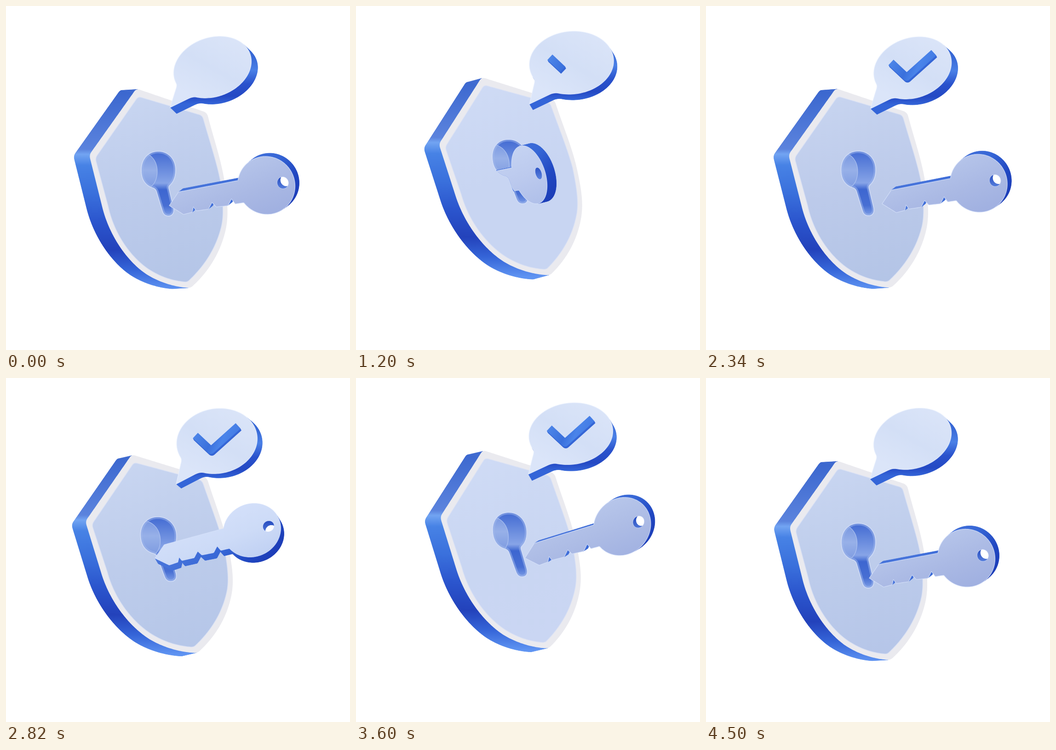
These frames come from a looping animation (748 by 748 pixels, 4530 ms). An HTML page with a canvas:

```html
<!DOCTYPE html>
<html lang="en">
<head>
<meta charset="utf-8">
<title>Shield and key</title>
<style>
html, body { margin: 0; width: 100%; height: 100%; overflow: hidden; background: #fff; }
canvas { display: block; width: 748px; height: 748px; }
</style>
</head>
<body>
<canvas id="stage" width="748" height="748"></canvas>
<script>
const g = document.getElementById('stage').getContext('2d');
const LOOP = 4530, SWAY = LOOP / 2;

// Sample an SVG path into points
function trace(d, step = 3) {
  const p = document.createElementNS('http://www.w3.org/2000/svg', 'path');
  p.setAttribute('d', d);
  const len = p.getTotalLength(), n = Math.round(len / step), out = [];
  for (let i = 0; i < n; i++) {
    const q = p.getPointAtLength(len * i / n);
    out.push([q.x, q.y]);
  }
  return out;
}

const RIM = trace('M279,186 Q283,180 290,182 L430,230 Q437,233 439,240 C452,290 466,330 474,375 ' +
  'C483,430 484,460 477,490 C465,540 438,580 406,609 Q402,613 396,613 C365,611 330,600 302,581 ' +
  'C261,552 225,498 210,440 L183,332 Q181,324 185,318 Z');
const PANEL = trace('M284,202 Q288,197 294,199 L421,237 Q427,239 429,246 C443,295 458,340 466,380 ' +
  'C473,430 474,460 467,485 C455,530 430,567 398,597 Q394,601 387,600 C360,597 335,589 308,571 ' +
  'C268,543 234,492 222,435 L196,338 Q194,331 198,325 Z');
const HOLE = trace('M317,395 C301,389 294,375 294,357 C294,333 309,316 331,316 C354,316 369,334 369,357 ' +
  'C369,372 364,384 355,391 Q353,394 355,400 L364,438 C367,450 362,457 353,457 C346,457 342,453 340,446 ' +
  'L327,403 Q325,397 317,395 Z');
const KEY = trace('M352,438 L373,408 L504,382 A63,63 0 1 1 516,430 L497,433 L489,422 L481,437 L455,440 ' +
  'L446,430 L438,445 L411,449 L405,440 L402,452 L383,457 Z', 2);
const EYE = trace('M590,387 A12.5,13 0 1 1 615,385 A12.5,13 0 1 1 590,387 Z', 2);
const FRONT = [[312, 150], [950, 150], [950, 800], [352, 800], [340, 455]];

// Frames the shapes above are drawn in: origin and two axes
const SHIELD_BASE = [285, 181, -104, 141, 113, 432];
const KEY_BASE = [562, 394, -210, 44, -13, -62];

const wave = (t, mid, c, s) => {
  const a = 2 * Math.PI * t / SWAY;
  return mid + c * Math.cos(a) + s * Math.sin(a);
};
const ramp = (t, a, b) => {
  const s = Math.min(1, Math.max(0, (t - a) / (b - a)));
  return s * s * (3 - 2 * s);
};

function mapper(a, b) {
  const det = a[2] * a[5] - a[3] * a[4];
  return pts => pts.map(([x, y]) => {
    x -= a[0]; y -= a[1];
    const u = (x * a[5] - y * a[4]) / det, v = (a[2] * y - a[3] * x) / det;
    return [b[0] + u * b[2] + v * b[4], b[1] + u * b[3] + v * b[5]];
  });
}

const shift = (pts, dx, dy) => pts.map(([x, y]) => [x + dx, y + dy]);

function outline(...shapes) {
  const p = new Path2D();
  for (const pts of shapes) {
    pts.forEach(([x, y], i) => i ? p.lineTo(x, y) : p.moveTo(x, y));
    p.closePath();
  }
  return p;
}

// Linear gradient with stops given as position, colour pairs
function shade(x0, y0, x1, y1, ...stops) {
  const f = g.createLinearGradient(x0, y0, x1, y1);
  for (let i = 0; i < stops.length; i += 2) f.addColorStop(stops[i], stops[i + 1]);
  return f;
}

const mix = (a, b, k) => 'rgb(' + a.map((v, i) => Math.round(v + (b[i] - v) * k)).join() + ')';

function fill(path, style) {
  g.fillStyle = style;
  g.fill(path);
}

function line(path, style, width) {
  g.strokeStyle = style;
  g.lineWidth = width;
  g.stroke(path);
}

// Side walls of a clockwise outline that face the viewer
function extrude(pts, dx, dy, style) {
  g.lineJoin = 'round';
  fill(outline(shift(pts, dx, dy)), style);
  pts.forEach(([x, y], i) => {
    const [u, v] = pts[(i + 1) % pts.length];
    if ((v - y) * dx <= (u - x) * dy) return;
    const quad = outline([[x, y], [u, v], [u + dx, v + dy], [x + dx, y + dy]]);
    fill(quad, style);
    line(quad, style, 0.7);
  });
}

function shieldPose(t) {
  return {
    frame: [
      wave(t, 279.6, 5.4, -4.6), wave(t, 168.2, 12.6, -1),
      wave(t, -99.7, -4.3, -2.8), wave(t, 142, -0.7, 0.5),
      wave(t, 129.1, -16.1, 8.9), wave(t, 430.5, 1.5, -0.5)
    ],
    dx: wave(t, -33.1, -0.9, 3.1),
    dy: wave(t, 5.6, -3.6, 1.4),
    light: wave(t, 0.5, -0.4, -0.35)
  };
}

function drawShield({ frame, dx, dy, light }) {
  const [x, y, , , vx, vy] = frame, low = y + vy + 4;
  const place = mapper(SHIELD_BASE, frame);
  const rim = place(RIM), hole = place(HOLE), face = outline(place(PANEL));
  extrude(rim, dx, dy, shade(0, y, 0, low, 0, '#3a66ce', 0.3, '#5b83dd', 0.325, '#72a4f2',
    0.38, '#4782e5', 0.52, '#3a70dc', 0.66, '#2b55cd', 0.8, '#2342bb', 0.9, '#3565d8', 1, '#5f94f2'));
  fill(outline(rim), '#eaeaef');
  fill(face, shade(x, y, x + vx, low,
    0, mix([200, 213, 240], [207, 219, 245], light),
    0.5, mix([187, 202, 234], [201, 214, 242], light),
    1, mix([178, 195, 230], [201, 214, 243], light)));
  line(face, 'rgba(218,226,245,.8)', 1.5);

  const edge = outline(hole), floor = outline(shift(hole, dx * 1.18, dy * 1.18));
  const top = y + vy * 0.31, bottom = top + 141;
  g.save();
  g.clip(edge);
  fill(edge, shade(0, top, 0, bottom, 0, '#4169d2', 0.25, '#6487dc', 0.5, '#87a4e7',
    0.6, '#3d66d0', 0.85, '#486fd3', 1, '#7b9ce6'));
  fill(floor, shade(0, top, 0, bottom, 0, '#7292df', 0.3, '#97b0e8', 0.6, '#7c9ae0'));
  line(floor, 'rgba(185,203,243,.75)', 1.3);
  line(edge, 'rgba(160,183,236,.5)', 9);
  g.restore();
  line(edge, 'rgba(213,224,248,.85)', 1.8);
  return { hole: place([[331, 357]])[0], front: outline(hole, place(FRONT)) };
}

function drawBubble(t) {
  const cx = wave(t, 458.9, -9.9, 0.1), cy = wave(t, 128.9, 4.1, 8.1);
  const rx = wave(t, 88, -3.6, -0.3), ry = wave(t, 68, -1, 3), lean = wave(t, -8, -4.6, 2.8);
  const tip = [wave(t, 367.5, -10.5, 2.8), wave(t, 218, 2.5, 12.5)];
  const dx = wave(t, 10.7, 3.2, 0.2), dy = wave(t, 12.6, 0.8, -3.4);
  const h = Math.sqrt(ry * ry - lean * lean);
  const tx = (tip[0] - cx) / rx, dir = Math.atan2((tip[1] - cy - lean * tx) / h, tx);
  const on = a => [cx + rx * Math.cos(a), cy + lean * Math.cos(a) + h * Math.sin(a)];
  const toward = (p, s) => p.map((v, j) => v + (tip[j] - v) * s);
  const pts = [];
  const bend = (a, b, c) => {
    for (let s = 0.125; s <= 1; s += 0.125) {
      const r = 1 - s;
      pts.push(a.map((v, j) => r * r * v + 2 * r * s * b[j] + s * s * c[j]));
    }
  };
  const start = dir + 0.44, end = dir - 0.37 + 2 * Math.PI;
  for (let i = 0; i <= 120; i++) pts.push(on(start + (end - start) * i / 120));
  const right = on(dir - 0.25), left = on(dir + 0.37);
  bend(on(end), right, toward(right, 0.2));
  pts.push(tip);
  bend(toward(left, 0.15), left, on(start));

  extrude(pts, dx, dy, shade(0, cy - ry, 0, cy + ry + dy, 0, '#3a68d5', 0.3, '#3768d6', 0.5, '#4a80e6',
    0.7, '#2a52cc', 0.88, '#2449c4', 1, '#3465d8'));
  const face = outline(pts);
  fill(face, shade(cx + rx * 0.4, cy - ry, cx - rx * 0.5, cy + ry, 0, '#dae4f8', 0.5, '#d3dff6', 1, '#dbe5f9'));
  line(face, 'rgba(232,239,253,.8)', 1.4);

  const grow = ramp(t, 1080, 1410) - ramp(t, 3960, 4260);
  if (grow > 0) drawCheck(cx, cy, grow);
}

function drawCheck(cx, cy, grow) {
  const blue = shade(cx - 50, cy - 20, cx + 46, cy + 24, 0, '#4f88ea', 0.4, '#3a70dc', 0.6, '#4a84ea', 1, '#3f76e0');
  g.save();
  g.lineJoin = 'round';
  g.setLineDash([127 * grow, 300]);
  for (let i = 4; i >= 0; i--) {
    const x = cx + i / 2, y = cy + i, p = new Path2D();
    p.moveTo(x - 47, y - 12);
    p.lineTo(x - 13, y + 20);
    p.lineTo(x + 46, y - 33);
    line(p, i ? '#3566d6' : blue, 16);
  }
  g.restore();
}

// The key floats, leans towards the lock once, and sits in the hole while plugged
function drawKey(t, { hole, front }) {
  const plug = ramp(t, 130, 530) - ramp(t, 1850, 2370);
  const away = ramp(t, 1640, 2300) - ramp(t, 3950, 4500);
  const lean = ramp(t, 2400, 2950) - ramp(t, 2950, 3900);
  const roll = Math.min(1, 1.35 * lean * lean);
  const free = [
    562 + 29 * away - 70 * lean, wave(t, 350.5, 41.5, -18.5),
    -207, wave(t, 56, -14, 3), -14, -62 + 7 * lean,
    9 - 2 * roll, -7 + 19 * roll, roll
  ];
  const fixed = [
    hole[0] + wave(t, 40.5, 0, -4.5), hole[1] + wave(t, 37, 0, -4),
    wave(t, -113, 0, 9), 26, -19, -63,
    20, -5, 0.5
  ];
  const pose = free.map((v, i) => v + (fixed[i] - v) * plug);
  const [x, y, , , , , dx, dy, light] = pose;
  const place = mapper(KEY_BASE, pose);
  const body = place(KEY), eye = place(EYE);
  const face = outline(body), ring = outline(eye);

  g.save();
  if (t < 2300) g.clip(front);
  extrude(body, dx, dy, shade(x - 70, y - 60, x + 60, y + 45, 0, '#4673da', 0.45, '#3767d6', 0.75, '#2148c2', 1, '#1c3cb6'));
  fill(face, shade(x - 30, y - 65, x + 20, y + 65,
    0, mix([182, 197, 234], [212, 224, 250], light),
    0.5, mix([170, 185, 228], [205, 219, 247], light),
    1, mix([159, 175, 224], [190, 207, 242], light)));
  line(face, 'rgba(214,225,250,.8)', 1.3);
  g.save();
  g.clip(ring);
  fill(ring, shade(0, y - 20, 0, y + 8, 0, '#2a50c2', 1, '#5a82de'));
  fill(outline(shift(eye, dx * 0.8, dy * 0.8)), plug > 0.7 ? '#3e68d0' : '#fff');
  g.restore();
  line(ring, 'rgba(205,218,248,.7)', 1);
  g.restore();
}

function draw(t) {
  g.clearRect(0, 0, 748, 748);
  const lock = drawShield(shieldPose(t));
  drawBubble(t);
  drawKey(t, lock);
}

const begin = performance.now();
function tick() {
  const t = (performance.now() - begin) % LOOP;
  draw(Math.floor(t / 30) * 30);
  requestAnimationFrame(tick);
}
tick();
</script>
</body>
</html>
```
